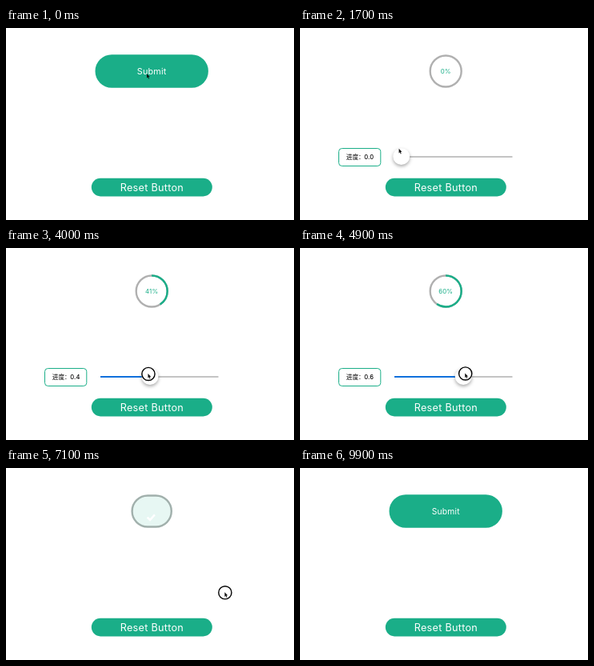
Write an HTML page with a canvas that moves like this. It is 360 px wide and 240 px high and loops after 10000 ms.

```html
<!DOCTYPE html>
<html lang="zh">
<head>
<meta charset="utf-8">
<style>
html, body { margin: 0; width: 100%; height: 100%; overflow: hidden; background: #fff; }
canvas { display: block; }
</style>
</head>
<body>
<canvas id="stage" width="360" height="240"></canvas>
<script>
const c = document.getElementById('stage').getContext('2d');
const LOOP = 10000, GREEN = '#1aae88', GREY = '#b0b0b0', BLUE = '#1070dc';
const SANS = 'Inter, "Noto Sans CJK SC", "Noto Sans CJK", sans-serif';
const CX = 182.2, CY = 54, RADIUS = 19.5;
const ARROW = new Path2D('M0 0v5.6l1.3-1.1 .9 2.1 .9-.4 -.9-2 1.6-.2z');

const ramp = (t, from, to) => Math.min(1, Math.max(0, (t - from) / (to - from)));
const mix = (a, b, u) => a + (b - a) * u;

// Button width: 1 is the full pill, 0 the ring
const openness = t => 1 - ramp(t, 100, 1690) + ramp(t, 6870, 9140);

// Drag distance; runs slightly past the end of the slider
const pull = t => 0.18 * ramp(t, 2200, 2700) + 0.23 * ramp(t, 2700, 4000) + 0.62 * ramp(t, 4000, 7000);

function cursorAt(t) {
  const glide = (x0, y0, x1, y1, u) => [mix(x0, x1, u), mix(y0, y1, u)];
  const drag = p => [114 + 154.7 * p, 158 - 2.6 * p];
  if (t < 1100) return glide(176, 57, 138, 140, ramp(t, 200, 1100));
  if (t < 2200) return glide(138, 140, ...drag(0), ramp(t, 1100, 2100));
  if (t < 7600) return drag(pull(t));
  return glide(...drag(pull(t)), 182, 30, ramp(t, 7600, 8700));
}

function pill(x, y, w, h, r) {
  c.beginPath();
  c.roundRect(x, y, w, h, r);
}

function stroke(color, width) {
  c.strokeStyle = color;
  c.lineWidth = width;
  c.stroke();
}

function text(s, x, y, size, color, align = 'center', weight = 400) {
  c.font = `${weight} ${size}px ${SANS}`;
  c.letterSpacing = size * 0.02 + 'px';
  c.textAlign = align;
  c.fillStyle = color;
  c.fillText(s, x, y);
}

function line(points, color, width) {
  c.beginPath();
  points.forEach(p => c.lineTo(...p));
  stroke(color, width);
}

function arc(x, y, r, part, color, width) {
  c.beginPath();
  c.arc(x, y, r, -Math.PI / 2, (part * 2 - 0.5) * Math.PI);
  stroke(color, width);
}

function drawButton(t) {
  const open = openness(t), w = 2 * RADIUS + 100 * open;
  pill(CX - w / 2, CY - RADIUS, w, 2 * RADIUS, RADIUS);
  c.fillStyle = `rgba(26,174,136,${open})`;
  c.fill();
  stroke(`rgb(${mix(176, 26, open)},${mix(176, 174, open)},${mix(176, 136, open)})`, 2.4);
  if (t > 6870 && t < 9400) {
    const s = mix(0.3, 1, ramp(t, 7000, 8000));
    line([[180 - 9 * s, 65 - 9 * s], [180, 65], [180 + 16 * s, 65 - 18 * s]], '#fff', 2.5);
  } else {
    text('Submit', CX, 58, t < 200 ? 10.8 : 10.3, '#fff');
  }
}

function drawProgress(value) {
  arc(CX, CY, RADIUS, 1, GREY, 2.4);
  arc(CX, CY, RADIUS, value, GREEN, 2.4);
  text(Math.round(value * 100) + '%', CX, 57, 7.9, GREEN);

  pill(48.5, 150.5, 52.3, 22, 4);
  stroke(GREEN, 1);
  text('进度：', 57.8, 164, 7.5, '#000', 'left', 500);
  text(value.toFixed(1), 80.3, 164, 7.5, '#000', 'left', 500);

  const knob = 126.7 + 130 * value, y = 161;
  line([[118, y], [265.5, y]], GREY, 1.6);
  line([[118, y], [knob, y]], BLUE, 1.8);
  c.save();
  c.shadowColor = 'rgba(0,0,0,.35)';
  c.shadowBlur = 4;
  c.shadowOffsetY = 2;
  c.beginPath();
  c.arc(knob, y - 0.3, 10.4, 0, 7);
  c.fillStyle = '#fff';
  c.fill();
  c.restore();
}

function drawCursor(t) {
  const [x, y] = cursorAt(t);
  if (t > 2100 && t < 7600) arc(x + 0.5, y + 0.5, 8.1, 1, '#000', 1.4);
  c.save();
  c.translate(x, y);
  c.fillStyle = '#111';
  c.fill(ARROW);
  c.restore();
}

function draw(t) {
  c.clearRect(0, 0, 360, 240);
  if (t >= 1690 && t < 6870) drawProgress(Math.min(1, pull(t)));
  else drawButton(t);
  pill(106.8, 187.8, 151, 22.6, 11.3);
  c.fillStyle = GREEN;
  c.fill();
  text('Reset Button', 182.4, 204, 12.7, '#fff');
  if (t < 8800) drawCursor(t);
}

const start = performance.now();
function tick() {
  draw((performance.now() - start) % LOOP);
  requestAnimationFrame(tick);
}
tick();
</script>
</body>
</html>
```
